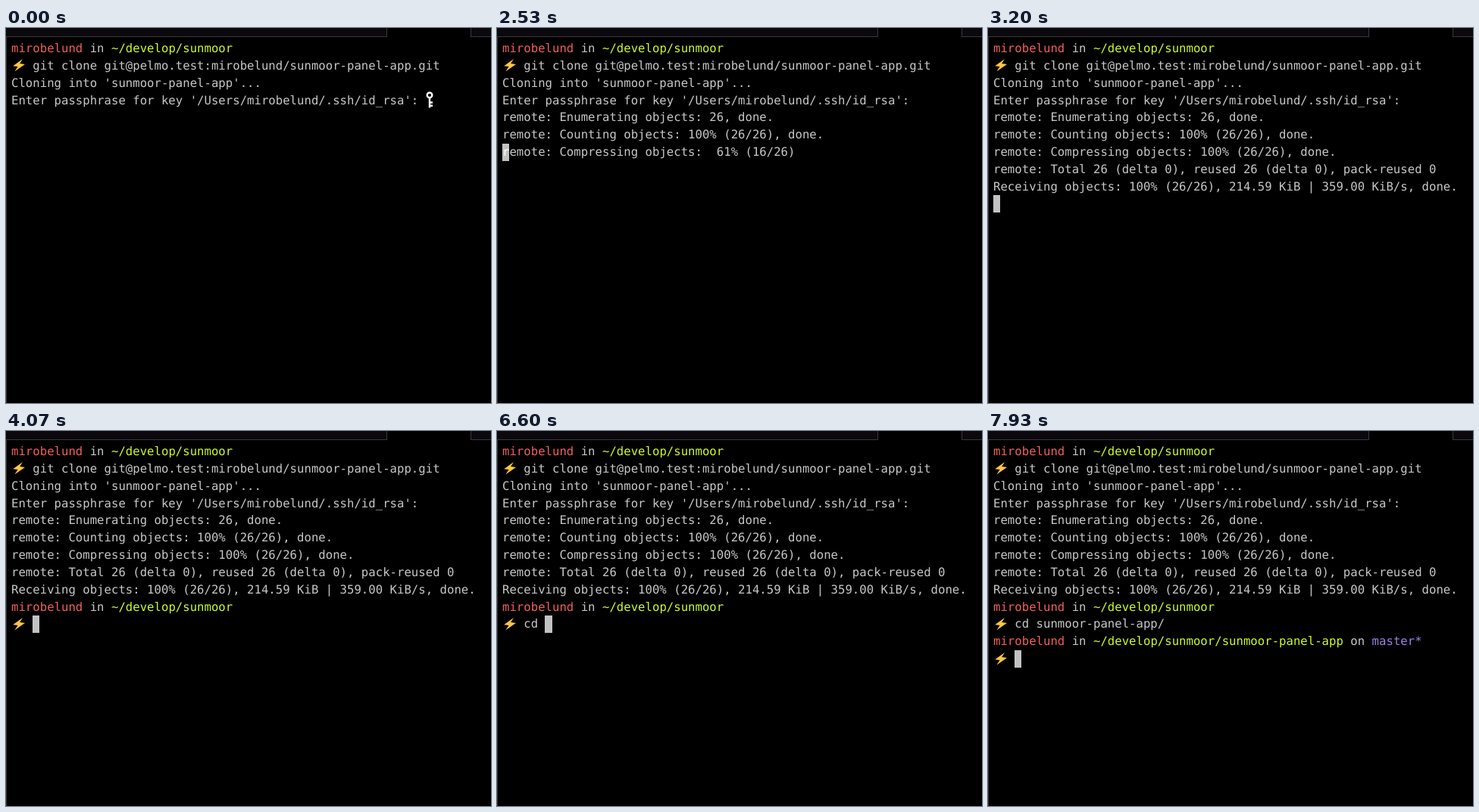
Animation, 640 px wide and 496 px high, one loop 8000 ms. Source, as an HTML page:

```html
<!DOCTYPE html>
<html lang="en">
<head>
<meta charset="utf-8">
<title>Terminal</title>
<style>
  html, body { margin: 0; width: 100%; height: 100%; overflow: hidden; background: #000; }
  #stage { position: absolute; left: 0; top: 0; width: 640px; height: 496px; overflow: hidden; background: #000; }
  #stage > * { position: absolute; box-sizing: border-box; }
  .tab { top: 0; height: 12px; background: #0c090e; border: solid #3a383c; border-width: 0 0 1px; }
  .edge { left: 0; top: 12px; width: 1px; height: 484px; background: #363636; }
  #text {
    left: 7px; top: 16px; margin: 0; color: #c7c7c7;
    font: 15.66px/22.85px "DejaVu Sans Mono", monospace;
    text-rendering: geometricPrecision; font-variant-ligatures: none;
  }
  .user { color: #ee605a; }
  .path { color: #cbfa30; }
  .branch { color: #9c80ec; }
  .covered { color: #fff; }
  #cursor { width: 9.4px; height: 22.85px; background: #c2c2c2; }
  .bolt { width: 28px; height: 23px; }
</style>
</head>
<body>
<div id="stage">
  <div class="tab" style="left:0;width:503px;border-right-width:1px"></div>
  <div class="tab" style="left:613px;width:27px;border-left-width:1px"></div>
  <div class="edge"></div>
  <div id="cursor"></div>
  <pre id="text"></pre>
  <svg id="key" width="11" height="23" fill="none" stroke="#fff" stroke-width="2.4">
    <circle cx="5" cy="4.8" r="3.3"/>
    <path d="M5 8V21.6M5 14.5H9M5 18.8H9"/>
  </svg>
</div>
<script>
const LOOP = 8000, LEFT = 6.7, TOP = 15.6, COL = 9.43, ROW = 22.85, TOTAL = 26;
const stage = document.getElementById('stage');
const text = document.getElementById('text');
const cursor = document.getElementById('cursor');
const key = document.getElementById('key');

const user = 'mirobelund', folder = 'sunmoor', app = folder + '-panel-app';
const span = (name, content) => `<span class="${name}">${content}</span>`;
const prompt = path => `${span('user', user)} in ${span('path', '~/develop/' + path)}`;

function place(element, row, col) {
  element.style.left = LEFT + col * COL + 'px';
  element.style.top = TOP + row * ROW + 'px';
}

const bolts = [1, 10, 12].map(row => {
  stage.insertAdjacentHTML('beforeend',
    '<svg class="bolt"><path fill="#ffc544" d="M15 3L2.2 12.2L8.6 12.9L4.4 19.4L18 9.9L11.2 9.1Z"/></svg>');
  const element = stage.lastElementChild;
  place(element, row, 0);
  return { element, row };
});

function progress(label, count) {
  const percent = String(Math.floor(count / TOTAL * 100)).padStart(3);
  return `${label} objects: ${percent}% (${count}/${TOTAL})`;
}

const cover = line => span('covered', line[0]) + line.slice(1);

// Returns the visible lines and the cursor cell; no cursor cell means the key is shown.
function screen(t) {
  const lines = [
    prompt(folder),
    `   git clone git@pelmo.test:${user}/${app}.git`,
    `Cloning into '${app}'...`,
    `Enter passphrase for key '/Users/${user}/.ssh/id_rsa': `
  ];
  const at = (col = 0, row = lines.length) => ({ lines, row, col });

  if (t < 2000) return { lines };
  if (t < 2530) return at();

  lines.push(`remote: Enumerating objects: ${TOTAL}, done.`,
    `remote: ${progress('Counting', TOTAL)}, done.`);
  if (t < 2600) {
    lines.push(cover('remote: ' + progress('Compressing', 16)));
    return at(0, 6);
  }
  lines.push(`remote: ${progress('Compressing', TOTAL)}, done.`);
  if (t < 3000) return at();

  lines.push(`remote: Total ${TOTAL} (delta 0), reused ${TOTAL} (delta 0), pack-reused 0`);
  if (t < 3190) {
    lines.push(cover(progress('Receiving', 1 + Math.floor((t - 3000) / 65) * 9)));
    return at(0, 8);
  }
  lines.push(`${progress('Receiving', TOTAL)}, 214.59 KiB | 359.00 KiB/s, done.`);
  if (t < 3400) return at();

  const typed = t < 6400 ? '' : t < 6470 ? 'c' : t < 6600 ? 'cd' : t < 6800 ? 'cd ' : `cd ${app}/`;
  lines.push(prompt(folder), '   ' + typed);
  if (t < 7000) return at(3 + typed.length, 10);
  if (t < 7330) return at();

  lines.push(`${prompt(folder + '/' + app)} on ${span('branch', 'master*')}`, '   ');
  return at(3, 12);
}

let shown = '';
function draw(now) {
  const { lines, row, col } = screen(now % LOOP);
  const html = lines.join('\n');
  if (html !== shown) text.innerHTML = shown = html;
  const hasCursor = row !== undefined;
  cursor.style.display = hasCursor ? '' : 'none';
  key.style.display = hasCursor ? 'none' : '';
  if (hasCursor) place(cursor, row, col);
  for (const bolt of bolts) bolt.element.style.display = bolt.row < lines.length ? '' : 'none';
}

place(key, 3, 58);
const start = performance.now();
function frame() {
  draw(performance.now() - start);
  requestAnimationFrame(frame);
}
frame();
</script>
</body>
</html>
```
